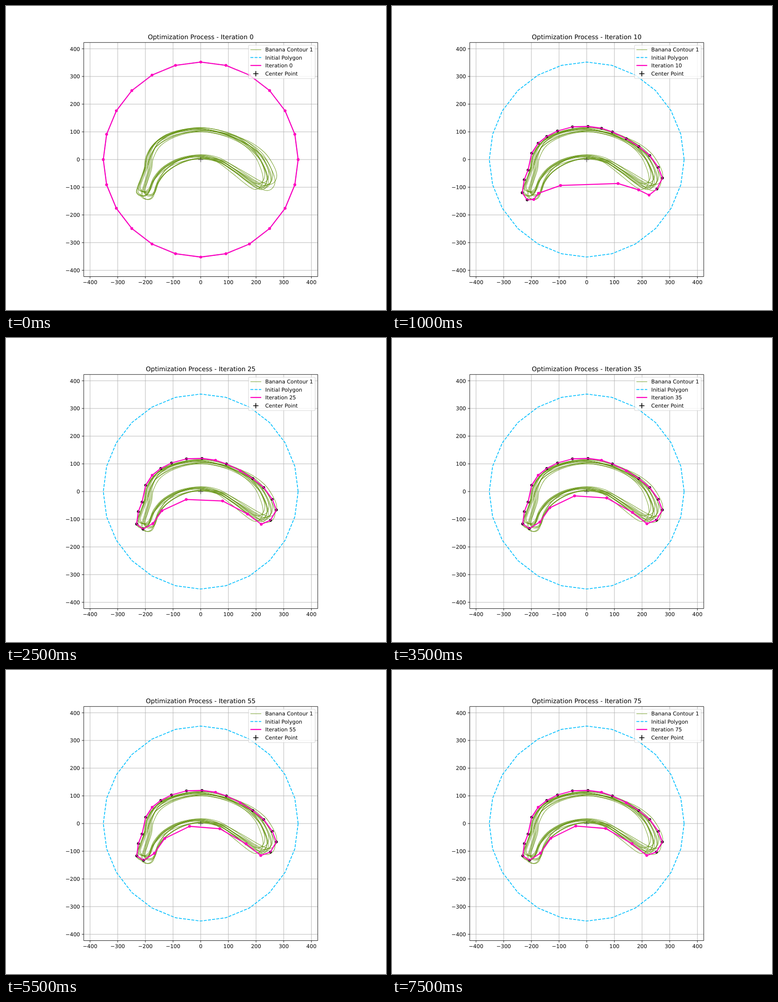
An HTML page that plays this animation: 837x669 px, repeating every 8000 ms.

```html
<!DOCTYPE html>
<html lang="en">
<head>
<meta charset="utf-8">
<title>Optimization Process</title>
<style>
  html, body { margin: 0; width: 100%; height: 100%; overflow: hidden; background: #fff; }
  svg { display: block; width: 100%; height: 100%; }
  text { font: 11.62px "DejaVu Sans", Verdana, sans-serif; text-rendering: geometricPrecision; }
  #title { font-size: 13.95px; }
</style>
</head>
<body>
<svg id="stage" viewBox="0 0 837 669"></svg>
<script>
const stage = document.getElementById('stage');
const CX = 428.9, CY = 337.9, UNIT = 0.6095;
const BOX = { l: 171.2, t: 80.3, r: 686.7, b: 595.5 };
const MAGENTA = '#ff00bf', CYAN = '#00bfff', OLIVE = '#5b8c00', DARK = '#1a0013';
const OLIVE_LINE = { 'stroke-opacity': .8 };
const DASHED = { 'stroke-dasharray': '6.44 2.79' };

function add(tag, attrs, text) {
  const el = document.createElementNS('http://www.w3.org/2000/svg', tag);
  for (const key in attrs) el.setAttribute(key, attrs[key]);
  if (text !== undefined) el.textContent = text;
  return stage.appendChild(el);
}
const line = (d, stroke, width, more) =>
  add('path', { d, stroke, 'stroke-width': width, fill: 'none', 'stroke-linejoin': 'round', ...more });
const mix = (a, b, t) => a + (b - a) * t;
const ring = pts => 'M' + pts.map(p => p.map(v => v.toFixed(2)).join(' ')).join('L') + 'Z';

// Closed Catmull-Rom spline
function smooth(pts) {
  const n = pts.length, at = i => pts[(i + n) % n];
  let d = 'M' + pts[0];
  for (let i = 0; i < n; i++) {
    const [a, b, c, e] = [at(i - 1), at(i), at(i + 1), at(i + 2)];
    d += `C${b[0] + (c[0] - a[0]) / 6} ${b[1] + (c[1] - a[1]) / 6} ` +
         `${c[0] - (e[0] - b[0]) / 6} ${c[1] - (e[1] - b[1]) / 6} ${c[0]} ${c[1]}`;
  }
  return d + 'Z';
}

// Axes
for (let v = -400; v <= 400; v += 100) {
  const x = CX + v * UNIT, y = CY - v * UNIT;
  const label = String(v).replace('-', '\u2212');
  line(`M${x} ${BOX.t}V${BOX.b}M${BOX.l} ${y}H${BOX.r}`, '#b0b0b0', 0.93);
  line(`M${x} ${BOX.b}v4.1M${BOX.l} ${y}h-4.1`, '#000', 0.93);
  add('text', { x, y: 612.3, 'text-anchor': 'middle' }, label);
  add('text', { x: 163, y: y + 4.4, 'text-anchor': 'end' }, label);
}

// One banana outline around the centre, varied evenly in tilt, size, bend and place
const banana = [
  [0, -66], [52, -57], [96, -38], [129, -11], [146, 18], [152, 40], [146, 56], [132, 60],
  [112, 49], [76, 24], [40, 2], [0, -6], [-42, 1], [-78, 21], [-99, 46], [-109, 72],
  [-121, 79], [-133, 70], [-126, 46], [-117, 18], [-113, -8], [-95, -37], [-54, -58]
];
const COUNT = 11;
for (let i = 0; i < COUNT; i++) {
  const vary = (k, size) => (((i * k + k * k) % COUNT) / 5 - 1) * size;
  const tilt = vary(3, .055), wide = 1 + vary(2, .07), high = 1 + vary(4, .04);
  const bend = vary(7, 5), dx = vary(5, 5), dy = vary(6, 5);
  const pts = banana.map(([px, py]) => {
    const x = px * wide, y = py * high + bend * (px / 150) ** 2;
    return [CX + dx + x * Math.cos(tilt) - y * Math.sin(tilt),
            CY + dy + x * Math.sin(tilt) + y * Math.cos(tilt)];
  });
  line(smooth(pts), OLIVE, 1.1, OLIVE_LINE);
}

// The polygon starts as a circle and shrinks onto this hull
const circle = Array.from({ length: 24 }, (_, i) => {
  const a = i * Math.PI / 12;
  return [CX + 214.6 * Math.cos(a), CY - 214.6 * Math.sin(a)];
});
const hull = [
  [586.5, 355], [567.7, 329], [543.7, 309.3], [516, 292], [485.5, 277], [461.5, 269],
  [431.7, 265], [397.5, 266], [364.5, 275], [341, 287], [322, 302], [307.7, 324],
  [299.7, 361], [291.5, 382], [288, 409], [303, 418.5], [327, 403], [350, 370],
  [405, 343], [470.5, 348.5], [528.5, 382], [561, 408], [582.3, 400.7], [595.5, 378.3]
];

// Vertices reach the hull at a steady pace; the hollow below fills in slowly afterwards
function polygonAt(it) {
  const sag = 60 * Math.min(1, it / 5) / (1 + (it / 17) ** 3.5);
  return hull.map(([x, y], i) => {
    const pace = .146 - .006 * Math.sin(i * Math.PI / 12);
    const rest = Math.max(0, 1 - it * pace);
    const drop = sag * Math.exp(-(((i - 18) / 2.2) ** 2));
    const side = i < 19 ? -.65 : .65;
    return [mix(x, circle[i][0], rest) + side * drop, mix(y, circle[i][1], rest) + drop];
  });
}
// Vertices that still move are magenta, settled ones dark
const isFree = (i, it) =>
  it <= 5 || (i > 15 && i < 22) || (it > 15 && [3, 5, 10].includes(i));

line(ring(circle), CYAN, 1.74, DASHED);
const dots = hull.map(() => add('circle', { r: 3.1 }));
const polygon = line('', MAGENTA, 2.32);
line(`M${CX - 5.5} ${CY}h11M${CX} ${CY - 5.5}v11`, '#000', 1.5, { 'stroke-opacity': .5 });

// Frame, legend and title
line(`M${BOX.l} ${BOX.t}H${BOX.r}V${BOX.b}H${BOX.l}Z`, '#000', 0.93, { 'stroke-linejoin': 'miter' });
add('rect', { x: 534.2, y: 86.3, width: 146.8, height: 73.4, rx: 2.4,
  fill: '#fff', 'fill-opacity': .8, stroke: '#ccc', 'stroke-opacity': .8, 'stroke-width': 1.1 });
line('M538.4 96.2h23.8', OLIVE, 1.1, OLIVE_LINE);
line('M538.4 113.4h23.8', CYAN, 1.74, DASHED);
line('M538.4 130.9h23.8', MAGENTA, 2.32);
line('M544.5 149h11.6M550.3 143.2v11.6', '#000', 1.74);
const [, , stepLabel] = ['Banana Contour 1', 'Initial Polygon', '', 'Center Point']
  .map((s, i) => add('text', { x: 571, y: 100.2 + i * 17.5 }, s));
const title = add('text', { id: 'title', x: CX, y: 73.2, 'text-anchor': 'middle' }, '');

const LOOP = 8000, STEP = 500;
let shown = -1;
function show(it) {
  const pts = polygonAt(it);
  polygon.setAttribute('d', ring(pts));
  dots.forEach((dot, i) => {
    dot.setAttribute('cx', pts[i][0]);
    dot.setAttribute('cy', pts[i][1]);
    dot.setAttribute('fill', isFree(i, it) ? MAGENTA : DARK);
  });
  stepLabel.textContent = 'Iteration ' + it;
  title.textContent = 'Optimization Process - Iteration ' + it;
}
const began = performance.now();
function tick() {
  const step = Math.floor(((performance.now() - began) % LOOP) / STEP);
  if (step !== shown) show((shown = step) * 5);
  requestAnimationFrame(tick);
}
tick();
</script>
</body>
</html>
```
